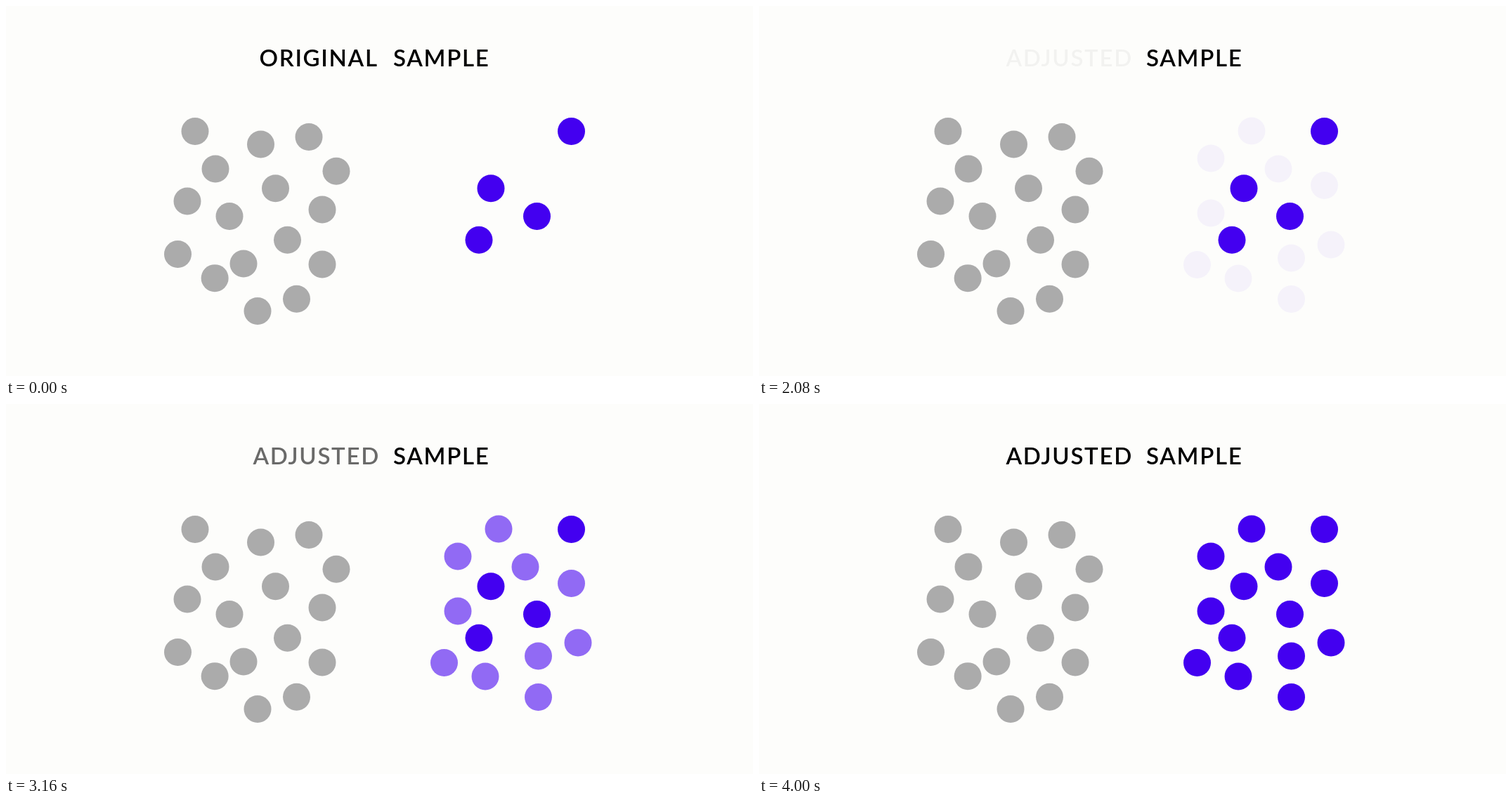
These frames come from a looping animation (1063x527 px, 5000 ms). An HTML page:

```html
<!DOCTYPE html>
<html lang="en">
<head>
<meta charset="utf-8">
<title>Sample adjustment</title>
<style>
  html, body {
    margin: 0;
    width: 100%;
    height: 100%;
    overflow: hidden;
    background: #fdfdfb;
  }
  svg { display: block; }
  text {
    font: 600 33px Lato, "Open Sans", sans-serif;
    letter-spacing: 1.7px;
    fill: #000;
  }
  .population { fill: #ababab; }
  .sample, .added { fill: #4300f0; }
  .before { animation: leave 5s infinite; }
  .after { animation: enter 5s infinite; }

  @keyframes leave {
    0% { opacity: 1; }
    26.4% { opacity: 1; animation-timing-function: steps(17); }
    40%, 100% { opacity: 0; }
  }
  @keyframes enter {
    0% { opacity: 0; }
    40% { opacity: 0; animation-timing-function: steps(50); }
    80%, 100% { opacity: 1; }
  }
</style>
</head>
<body>
<svg width="1063" height="527" viewBox="0 0 1063 527">
  <text class="before" x="360.5" y="86">ORIGINAL</text>
  <text class="after" x="351.5" y="86">ADJUSTED</text>
  <text x="551" y="86">SAMPLE</text>
  <g class="population"></g>
  <g class="added after"></g>
  <g class="sample"></g>
</svg>
<script>
  const R = 19.5;
  const MIRROR = 1073.5;

  // Dots along a parabola: start + step * i + bend * i²
  const trail = (count, [x, y], [dx, dy], [bx, by] = [0, 0]) =>
    Array.from({ length: count }, (_, i) =>
      [x + dx * i + bx * i * i, y + dy * i + by * i * i]);

  const mirror = ([x, y]) => [MIRROR - x, y];

  const draw = (name, dots) => {
    document.querySelector("." + name).innerHTML = dots
      .map(([x, y]) => `<circle cx="${x}" cy="${y}" r="${R}"/>`)
      .join("");
  };

  const corner = [269, 178.5];
  const inner = trail(4, [298, 232], [20, 67.5]);
  const middle = trail(4, [362.5, 197], [23, 57.5], [-2, 5.3]);

  draw("population", [
    corner, ...inner, ...middle,
    ...trail(2, [450, 290], [0, 4 * R]),
    ...trail(2, [431, 186.5], [2 * R, 2.5 * R]),
    ...trail(2, [244.5, 353.5], [2.7 * R, 1.75 * R]),
    [258, 278]
  ]);

  // The sample mirrors part of the population
  draw("sample", [corner, inner[1], middle[1], middle[2]].map(mirror));

  draw("added", [
    ...trail(3, [701, 178], [R, 27], [R - 1, 27]),
    ...trail(2, [643, 217], [0, 4 * R]),
    ...trail(2, [757.5, 359], [0, 3 * R]),
    ...trail(2, [623.5, 368.5], [3 * R, R]),
    [804.5, 255.5]
  ]);
</script>
</body>
</html>
```
